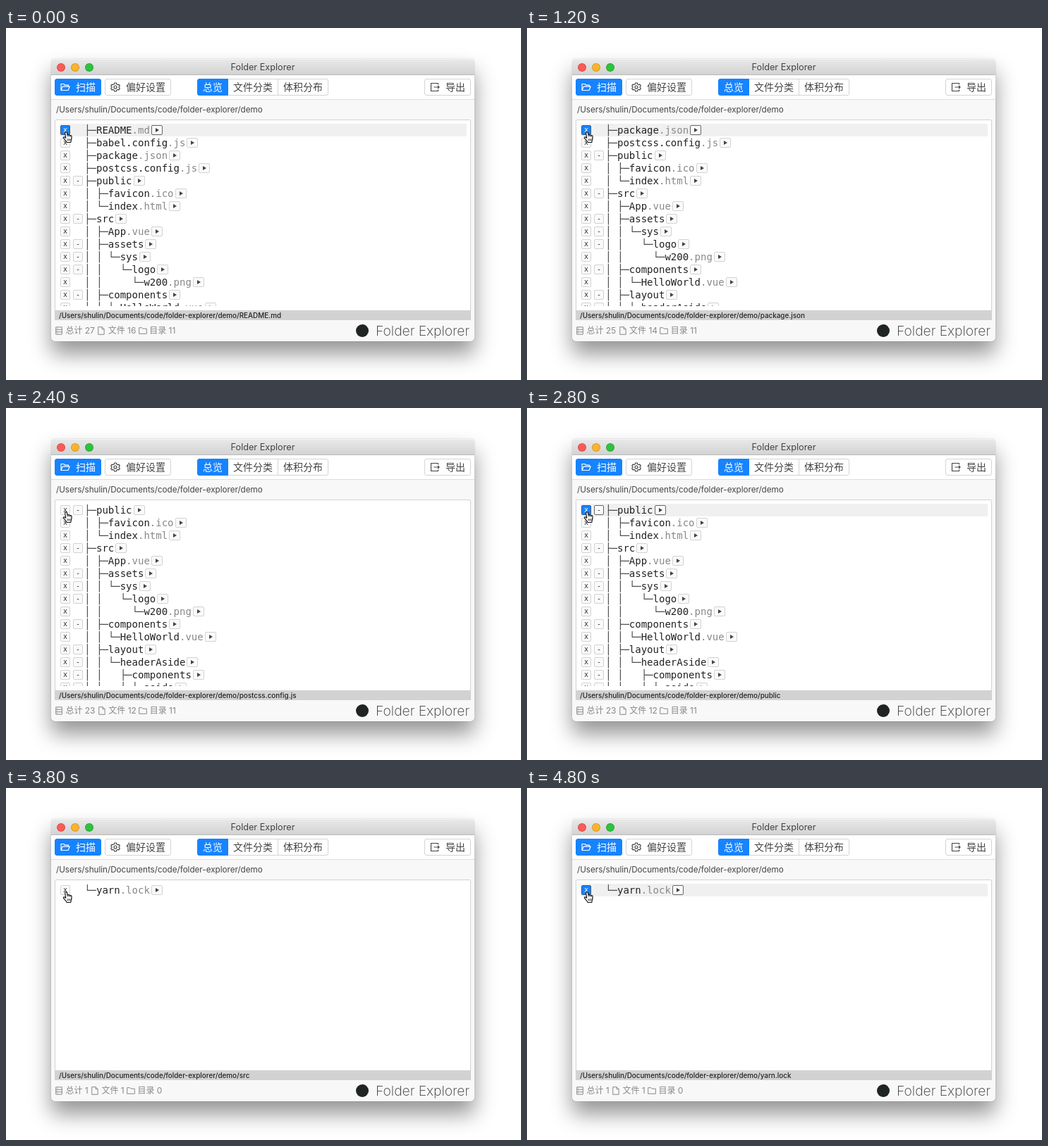
An HTML page for the animation above (5000 ms loop, 730 px wide and 500 px high).

```html
<!DOCTYPE html>
<html lang="zh-CN">
<head>
<meta charset="utf-8">
<title>Folder Explorer</title>
<style>
* { box-sizing: border-box; }
html, body { margin: 0; width: 100%; height: 100%; overflow: hidden; background: #fff; }
body { position: relative; font-family: Inter, "Noto Sans CJK SC", "Noto Sans CJK", sans-serif; color: #444; }
body > *, .abs { position: absolute; white-space: pre; }
svg { fill: none; stroke: currentColor; stroke-width: 1.15; stroke-linejoin: round; overflow: visible; }

.window { left: 64px; top: 44px; width: 600px; height: 401px; border-radius: 5px; background: #f8f8f8;
  box-shadow: 0 0 1px rgba(0,0,0,.5), 0 18px 30px rgba(0,0,0,.42); }
.title { left: 64px; top: 44px; width: 600px; height: 23px; border-radius: 5px 5px 0 0; text-align: center;
  font-size: 12.7px; line-height: 24px; background: linear-gradient(#e9e9e9, #d3d3d3);
  border-bottom: 1px solid #b9b9b9; box-shadow: inset 0 1px #f4f4f4; }
.light { top: 50px; width: 12px; height: 12px; border-radius: 50%; border: .5px solid rgba(0,0,0,.15); }
.bar { left: 64px; top: 67px; width: 600px; height: 35px; background: #fff; border-bottom: 1px solid #dedede; }

.btn { top: 72px; height: 24px; border: 1px solid #d4d4d4; border-radius: 3px; background: #fff;
  font-size: 14px; line-height: 22px; }
.btn span { position: absolute; top: 0; }
.btn svg { position: absolute; left: 7px; top: 4px; width: 14px; height: 14px; }
.blue { background: #1683ff; border-color: #1683ff; color: #fff; }

.root { left: 71px; top: 106px; font-size: 11.65px; line-height: 20px; }
.panel { left: 69px; top: 130px; width: 590px; height: 272px; background: #fff; border: 1px solid #d2d2d2; border-radius: 2px 2px 0 0; }
.status { left: 69px; top: 401px; width: 590px; height: 14px; padding-left: 6px; background: #d2d2d2;
  color: #222; font-size: 9.9px; line-height: 14px; font-weight: 500; }

.clip { left: 76px; top: 136px; width: 577px; height: 259px; overflow: hidden; }
.row { position: relative; height: 18px; font: 14px/18px "DejaVu Sans Mono", monospace; color: #222; }
.row .line { position: absolute; left: 35.1px; top: 0; display: flex; align-items: center; height: 18px; }
.tree { color: #444; }
.ext { color: #888; }
.key { position: absolute; top: 2px; width: 14px; height: 14px; border: 1px solid #d2d2d2; border-radius: 2px;
  background: #fafafa; color: #333; font-size: 10px; line-height: 11px; text-align: center; }
.line .key { position: static; width: 16px; margin-left: 2px; }
.key svg { display: block; width: 14px; height: 12px; fill: #444; stroke: none; }
.hover { background: #f0f0f0; }
.hover .key { border-color: #666; }
.hover .del { background: #1683ff; border-color: #4a5a70; color: #fff; }

.counts { left: 69px; top: 420px; height: 20px; display: flex; align-items: center; gap: 3.4px;
  color: #888; font-size: 12px; line-height: 20px; }
.counts svg { width: 12px; height: 12px; }
.mark { left: 496px; top: 421px; width: 18px; height: 18px; border-radius: 50%; background: #202422; }
.brand { right: auto; left: 520px; top: 418px; width: 137px; text-align: right; font-size: 19.3px; line-height: 24px;
  font-weight: 200; color: #333; direction: ltr; }
.hand { left: 80px; top: 147px; width: 14px; height: 17px; }
</style>
</head>
<body>
<div class="window"></div>
<div class="title">Folder Explorer</div>
<div class="light" style="left:72px;background:#fc5b57"></div>
<div class="light" style="left:92px;background:#fdb32c"></div>
<div class="light" style="left:112px;background:#2fc23f"></div>
<div class="bar"></div>

<div class="btn blue" style="left:69px;width:66px"><svg viewBox="0 0 14 14"><path d="M1 11.5v-9h4l1.4 1.6h5v2M1 11.5l2.2-5.4h10L11 11.5z"/></svg><span style="left:29px">扫描</span></div>
<div class="btn" style="left:140px;width:94px"><svg viewBox="0 0 14 14"><path d="M5.7 1h2.6l.4 1.7 1.6.9 1.7-.5 1.3 2.3L12 6.7v.6l1.3 1.3L12 10.9l-1.7-.5-1.6.9L8.3 13H5.7l-.4-1.7-1.6-.9-1.7.5L.7 8.6 2 7.3v-.6L.7 5.4 2 3.1l1.7.5 1.6-.9z"/><circle cx="7" cy="7" r="2"/></svg><span style="left:29px">偏好设置</span></div>
<div class="btn" style="left:271px;width:186px"><span style="left:50px">文件分类</span><span style="left:121px">体积分布</span></div>
<div class="btn blue" style="left:271px;width:44px;border-radius:3px 0 0 3px"><span style="left:7px">总览</span></div>
<div style="left:385px;top:72px;width:1px;height:24px;background:#d4d4d4"></div>
<div class="btn" style="left:593px;width:66px"><svg viewBox="0 0 14 14"><path d="M11.5 3.5v-2h-10v11h10v-2M5.5 7H13M11 5l2 2-2 2"/></svg><span style="left:29px">导出</span></div>

<div class="root" id="root"></div>
<div class="panel"></div>
<div class="clip"><div id="list"></div></div>
<div class="status" id="status"></div>

<div class="counts">
  <svg viewBox="0 0 14 14"><path d="M2 1h10v12H2zM2 5h10M2 9h10M4 3h1M4 7h1M4 11h1"/></svg><span id="total"></span>
  <svg viewBox="0 0 14 14"><path d="M2 .8h6.4l3.4 3.4v9H2zM8.2.8v3.6h3.6"/></svg><span id="files"></span>
  <svg viewBox="0 0 14 14"><path d="M.8 2h4.7L7 3.7h6.2V12H.8z"/></svg><span id="dirs"></span>
</div>
<div class="mark"></div>
<div class="brand">Folder Explorer</div>

<svg class="hand" viewBox="0 0 14 17"><path fill="#fff" stroke="#111" d="M4.2 1C5 .2 6.3.6 6.5 1.8L7 5c.5-.6 1.8-.5 2.1.3.7-.5 1.7-.3 2 .5.7-.4 1.8-.1 1.9 1 .2 1.7.2 3.2-.6 5.2l-.6 3.5H6.2C5.4 13.5 3 11.3 1.6 9.6.8 8.4 1.8 7.4 3 8l1.7 1.2-1-6.8C3.6 1.8 3.8 1.3 4.2 1z"/><path stroke="#111" stroke-width=".8" d="M7 5l.3 2.4M9.1 5.3l.2 2.2M11.1 5.8l.1 1.9M7.2 10.3v3M9 10.3v3M10.8 10.3v3"/></svg>

<script>
const ROOT = '/Users/shulin/Documents/code/folder-explorer/demo';
const LOOP = 5000;
const ROW = 18;

// Leading spaces give the depth, a trailing slash marks a folder.
const rows = `README.md
babel.config.js
package.json
postcss.config.js
public/
 favicon.ico
 index.html
src/
 App.vue
 assets/
  sys/
   logo/
    w200.png
 components/
  HelloWorld.vue
 layout/
  headerAside/
   components/
    aside/
     index.vue
    header/
     index.vue
   index.vue
 main.js
 router.js
 store.js
yarn.lock`.split('\n').map(text => {
  const name = text.trim();
  return { depth: text.search(/\S/), dir: name.endsWith('/'), name: name.replace('/', '') };
});

// [start ms, first row left, row is hovered, row named in the status line]
const steps = [
  [0, 0, true, 0],
  [400, 1, false, 0], [600, 1, true, 1],
  [1000, 2, false, 1], [1200, 2, true, 2],
  [1800, 3, false, 2], [2000, 3, true, 3],
  [2400, 4, false, 3], [2600, 4, true, 4],
  [3200, 7, false, 4], [3400, 7, true, 7],
  [3800, 26, false, 7], [4000, 26, true, 26]
];

const $ = id => document.getElementById(id);

function hasNext(index, depth) {
  const next = rows.slice(index + 1).find(r => r.depth <= depth);
  return !!next && next.depth === depth;
}

function branch(row, index) {
  let text = '';
  for (let d = 0; d < row.depth; d++) text += hasNext(index, d) ? '│ ' : '  ';
  return text + (hasNext(index, row.depth) ? '├─' : '└─');
}

function rowHtml(row, index) {
  const dot = row.dir ? -1 : row.name.lastIndexOf('.');
  const base = dot < 0 ? row.name : row.name.slice(0, dot);
  const ext = dot < 0 ? '' : row.name.slice(dot);
  const fold = row.dir ? '<span class="key" style="left:19px">-</span>' : '';
  return `<div class="row"><span class="key del" style="left:1px">x</span>${fold}` +
    `<span class="line"><span class="tree">${branch(row, index)}</span><span>${base}</span>` +
    `<span class="ext">${ext}</span><span class="key"><svg viewBox="0 0 14 12">` +
    `<path d="M5 3l5 3-5 3z"/></svg></span></span></div>`;
}

function show([, first, hover, named]) {
  const left = rows.slice(first);
  const dirs = left.filter(r => r.dir).length;
  $('list').style.transform = `translateY(${-ROW * first}px)`;
  [...$('list').children].forEach((el, i) => el.classList.toggle('hover', hover && i === first));
  $('status').textContent = `${ROOT}/${rows[named].name}`;
  $('total').textContent = `总计 ${left.length}`;
  $('files').textContent = `文件 ${left.length - dirs}`;
  $('dirs').textContent = `目录 ${dirs}`;
}

$('root').textContent = ROOT;
$('list').innerHTML = rows.map(rowHtml).join('');

const start = performance.now();
let current;
function tick() {
  const time = (performance.now() - start) % LOOP;
  const step = steps.filter(s => s[0] <= time).pop();
  if (step !== current) show(current = step);
  requestAnimationFrame(tick);
}
tick();
</script>
</body>
</html>
```
